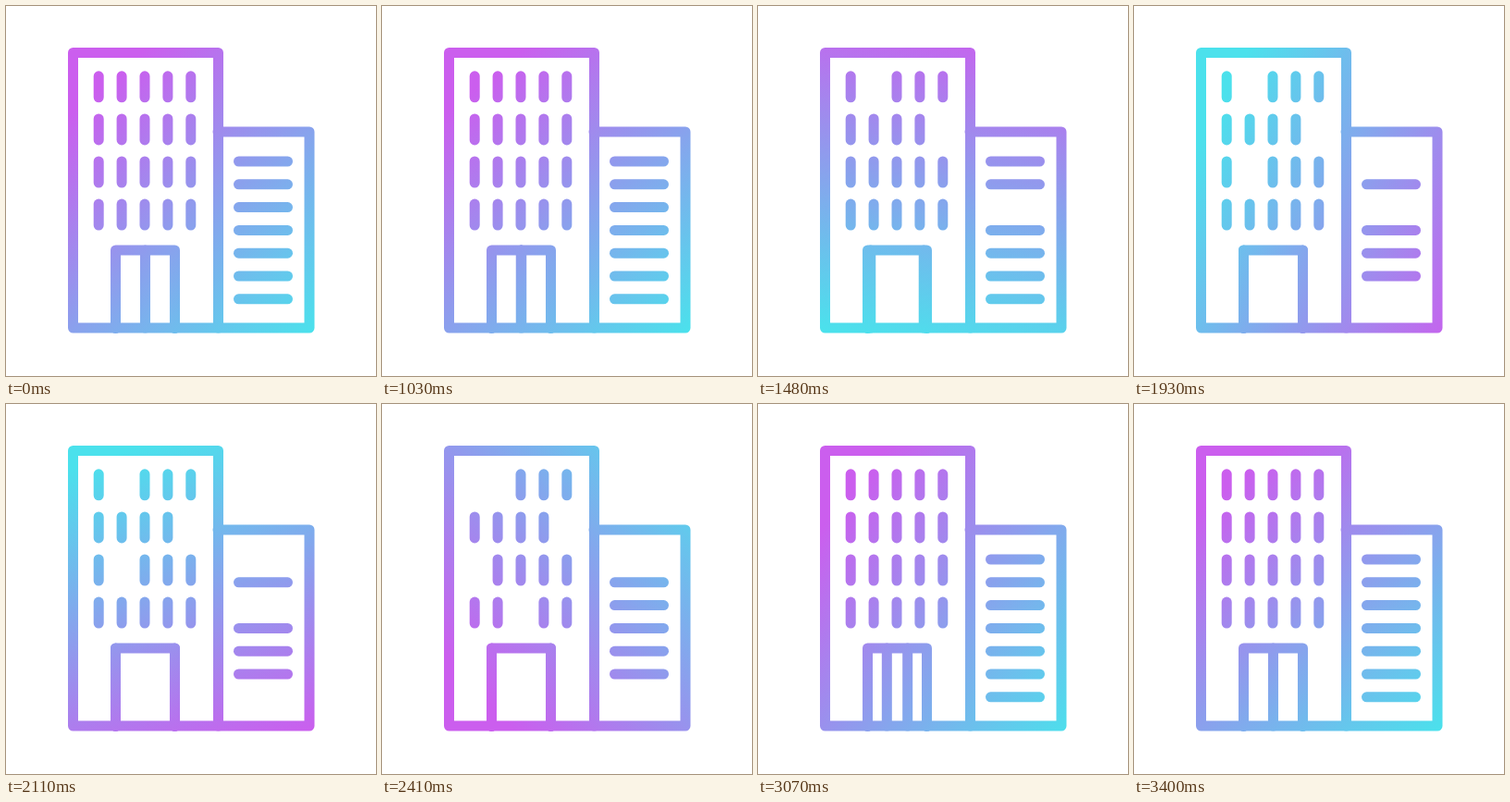
Write an HTML page that moves like this. It is 400 by 400 pixels and loops after 3.43 s.

```html
<!DOCTYPE html>
<html lang="en">
<head>
<meta charset="utf-8">
<title>Office buildings</title>
<style>
  html, body { margin: 0; width: 100%; height: 100%; overflow: hidden; background: #fff; }
  svg { display: block; width: 100%; height: 100%; }
</style>
</head>
<body>
<svg viewBox="0 0 400 400">
  <defs>
    <linearGradient id="tint" gradientUnits="userSpaceOnUse">
      <stop offset="0" stop-color="#cb5eee"/>
      <stop offset="1" stop-color="#4be1ec"/>
    </linearGradient>
  </defs>
  <g id="art" fill="none" stroke="url(#tint)" stroke-width="11" stroke-linecap="round" stroke-linejoin="round">
    <path d="M72.5 50.5H229.5V348H72.5Z"/>
    <path d="M229 136H328V348H229.5"/>
    <path d="M118.5 348.5V264H182.5V348.5"/>
    <path id="leaves"/>
  </g>
</svg>
<script>
const LOOP = 3430, START = 1000;
const art = document.getElementById('art');
const tint = document.getElementById('tint');
const leaves = document.getElementById('leaves');

// Intervals in which a light is off, keyed by row and column or by bar.
const off = {
  w01: [1300, 2620], w14: [1300, 2620], w21: [1700, 2170],
  w00: [2170, 3000], w20: [2170, 3000], w32: [2170, 3000],
  b0: [1700, 3000], b2: [1300, 2170], b6: [1700, 2620]
};
const blinkers = [];

function addLight(key, d) {
  const path = document.createElementNS('http://www.w3.org/2000/svg', 'path');
  path.setAttribute('d', d);
  art.append(path);
  if (off[key]) blinkers.push({ path, span: off[key] });
}

for (let row = 0; row < 4; row++)
  for (let col = 0; col < 5; col++)
    addLight(`w${row}${col}`, `M${100.2 + col * 24.9} ${75.8 + row * 46.1}v23`);
for (let i = 0; i < 7; i++) addLight(`b${i}`, `M251.5 ${168 + i * 24.8}h53`);

const clamp = v => Math.min(1, Math.max(0, v));
const smooth = v => v * v * (3 - 2 * v);

// Cubic bezier (x1, 0, x2, 1), solved by bisection.
function ease(x, x1, x2) {
  let lo = 0, hi = 1;
  for (let i = 0; i < 24; i++) {
    const s = (lo + hi) / 2, r = 1 - s;
    if (3 * x1 * s * r * r + 3 * x2 * s * s * r + s * s * s < x) lo = s;
    else hi = s;
  }
  return smooth(lo);
}

function draw(t) {
  const turn = ease(clamp((t - START) / (LOOP - START)), 0.3, 0.48);
  const angle = (229 + 360 * turn) * Math.PI / 180;
  const dx = 175 * Math.cos(angle), dy = 175 * Math.sin(angle);
  tint.setAttribute('x1', 240 + dx);
  tint.setAttribute('y1', 200 + dy);
  tint.setAttribute('x2', 240 - dx);
  tint.setAttribute('y2', 200 - dy);

  const open = smooth(clamp((t - START) / 600)) - smooth(clamp((t - 2710) / 600));
  const gap = 32 * open;
  leaves.setAttribute('d', `M${150.5 - gap} 264V348M${150.5 + gap} 264V348`);

  for (const { path, span } of blinkers)
    path.style.visibility = t >= span[0] && t < span[1] ? 'hidden' : 'visible';
}

const began = performance.now();
function tick() {
  draw((performance.now() - began) % LOOP);
  requestAnimationFrame(tick);
}
draw(0);
requestAnimationFrame(tick);
</script>
</body>
</html>
```
